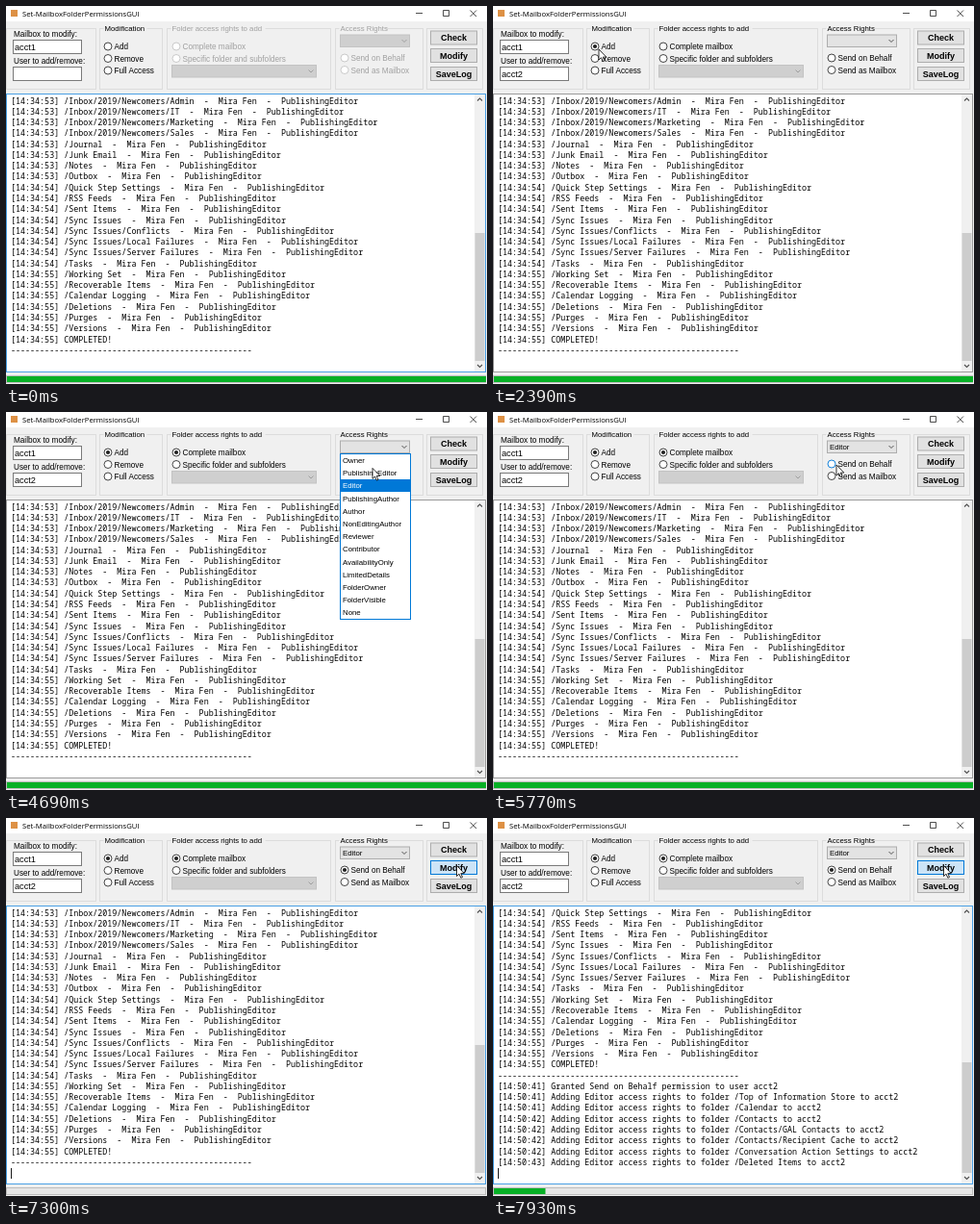
These frames come from a looping animation (500x393 px, 8 s). An HTML page:

```html
<!DOCTYPE html>
<html lang="en">
<head>
<meta charset="utf-8">
<title>Mailbox permissions</title>
<style>
  html, body { margin: 0; width: 100%; height: 100%; overflow: hidden; background: #f0f0f0; }
  svg { display: block; width: 500px; height: 393px; }
  text { font: 8.2px "Liberation Sans", Arial, sans-serif; white-space: pre; }
  .title { font: 7.7px "Open Sans", sans-serif; }
  .input { font-size: 9.2px; }
  .item { font-size: 7.8px; }
  .bold { font-size: 9px; font-weight: bold; text-anchor: middle; }
  .log { font: 8.37px "Noto Sans Mono", monospace; }
</style>
</head>
<body>
<svg id="stage" viewBox="0 0 500 393"></svg>
<script>
const LOOP = 8000, STEP = 76.9;
const BLUE = '#0078d7', GREY = '#a0a0a0', INK = '#000';
const PERSON = 'Mira Fen', OWNER = 'acct1', DELEGATE = 'acct2';
const LINE = 11.27, VISIBLE = 24;

// Folders grouped by the second in which they were logged
const scanned = [
  [53, 'Inbox/2019/Newcomers/Admin,Inbox/2019/Newcomers/IT,Inbox/2019/Newcomers/Marketing,Inbox/2019/Newcomers/Sales,Journal,Junk Email,Notes,Outbox'],
  [54, 'Quick Step Settings,RSS Feeds,Sent Items,Sync Issues,Sync Issues/Conflicts,Sync Issues/Local Failures,Sync Issues/Server Failures,Tasks'],
  [55, 'Working Set,Recoverable Items,Calendar Logging,Deletions,Purges,Versions']
];
const granted = [
  [41, 'Top of Information Store,Calendar'],
  [42, 'Contacts,Contacts/GAL Contacts,Contacts/Recipient Cache,Conversation Action Settings'],
  [43, 'Deleted Items']
];
const expand = (groups, format) =>
  groups.flatMap(([second, names]) => names.split(',').map(name => format(second, name)));
const log = [
  ...expand(scanned, (s, name) => `[14:34:${s}] /${name}  -  ${PERSON}  -  PublishingEditor`),
  '[14:34:55] COMPLETED!',
  '-'.repeat(50),
  `[14:50:41] Granted Send on Behalf permission to user ${DELEGATE}`,
  ...expand(granted, (s, name) => `[14:50:${s}] Adding Editor access rights to folder /${name} to ${DELEGATE}`)
];
const rights = ['Owner', 'PublishingEditor', 'Editor', 'PublishingAuthor', 'Author', 'NonEditingAuthor',
  'Reviewer', 'Contributor', 'AvailabilityOnly', 'LimitedDetails', 'FolderOwner', 'FolderVisible', 'None'];

// Pointer path: step, x, y
const path = [
  [24, 50, 68], [28, 106, 42], [31, 110, 45], [33, 163, 48], [36, 178, 42], [39, 180, 42],
  [43, 266, 53], [45, 330, 56], [46, 384, 57], [49, 392, 57], [54, 390, 38], [58, 390, 38],
  [63, 375, 72], [69, 372, 72], [75, 357, 55], [80, 356, 54], [86, 468.5, 49.5]
];

const clamp = (v, lo, hi) => Math.min(hi, Math.max(lo, v));

function pointerAt(step) {
  const next = path.findIndex(key => key[0] > step);
  if (next < 0) return path[path.length - 1].slice(1);
  const [s0, x0, y0] = path[next - 1], [s1, x1, y1] = path[next];
  const k = (step - s0) / (s1 - s0);
  return [x0 + (x1 - x0) * k, y0 + (y1 - y0) * k];
}

const rect = (x, y, w, h, fill, stroke = 'none') =>
  `<rect x="${x}" y="${y}" width="${w}" height="${h}" fill="${fill}" stroke="${stroke}"/>`;
const line = (d, stroke, width = 1) =>
  `<path d="${d}" fill="none" stroke="${stroke}" stroke-width="${width}"/>`;
const text = (x, y, str, cls = '', fill = INK) =>
  `<text x="${x}" y="${y}" class="${cls}" fill="${fill}">${str}</text>`;

function group(x, w, label = '', labelWidth = 0, fill = INK) {
  return rect(x, 23.5, w, 63, 'none', '#dcdcdc') +
    rect(x + 4, 20, labelWidth, 7, '#f0f0f0') + text(x + 5, 26, label, 'item', fill);
}

function radio(x, y, label, { on = false, enabled = true, hover = false } = {}) {
  const ring = !enabled ? '#c4c4c4' : hover ? BLUE : '#333';
  return `<circle cx="${x}" cy="${y}" r="4" fill="#fff" stroke="${ring}" stroke-width=".9"/>` +
    (on ? `<circle cx="${x}" cy="${y}" r="2.1" fill="${hover ? BLUE : '#222'}"/>` : '') +
    text(x + 6.5, y + 3, label, '', enabled ? INK : GREY);
}

function combo(x, y, w, enabled, value = '') {
  return rect(x, y, w, 12.5, enabled ? '#e3e3e3' : '#cfcfcf', enabled ? '#adadad' : '#c3c3c3') +
    text(x + 2.5, y + 9, value, 'item') +
    line(`M${x + w - 8} ${y + 5}l2.5 2.5l2.5 -2.5`, enabled ? '#444' : '#999', .9);
}

const field = (y, value, focused) =>
  rect(7.5, y, 71, 14, '#fff', focused ? BLUE : '#7a7a7a') + text(9, y + 10.5, value, 'input');

const button = (y, label, hot) =>
  rect(441.5, y, 48, 14, hot ? '#cce4f7' : '#e1e1e1', hot ? BLUE : '#adadad') +
  text(465.5, y + 10.2, label, 'bold');

function titleBar() {
  return rect(0, 0, 500, 16, '#fff') + rect(5, 4, 7, 7, '#dd9145') +
    text(17, 10.5, 'Set-MailboxFolderPermissionsGUI', 'title') +
    line('M426 7.5h7', '#222', .8) + line('M454.5 4.5h6v6h-6z', '#222', .8) +
    line('M482.5 4.5l6.5 6.5m0 -6.5l-6.5 6.5', '#222', .8);
}

function logView(step) {
  const added = clamp(step - 95, 0, 8), focused = step < 5 || step >= 90;
  const thumbTop = 236 + added * 2.25;
  return rect(.5, 91.5, 498, 289, '#fff', focused ? '#4aa0e4' : '#9a9a9a') +
    log.slice(added, added + VISIBLE)
      .map((row, i) => text(5, 101.6 + i * LINE, row, 'log')).join('') +
    (step >= 90 ? rect(5, 364, .9, 11, INK) : '') +
    rect(487, 92, 11, 288, '#f0f0f0') + rect(487.5, thumbTop, 10, 369 - thumbTop, '#cdcdcd') +
    line('M490 98.5l2.5 -2.5l2.5 2.5M490 373l2.5 2.5l2.5 -2.5', '#505050', 1.1);
}

function progress(step) {
  const width = step < 90 ? 498 : Math.max(0, (step - 98) * 10.7);
  return rect(.5, 384.5, 498, 7, '#e6e6e6', '#bcbcbc') + rect(1, 385, width, 6, '#06b025');
}

function rightsList() {
  return rect(347.5, 43.5, 73, 172, '#fff', BLUE) + rect(348, 70, 72, 13, BLUE) +
    rights.map((name, i) => text(350, 53 + i * 13.2, name, 'item', i === 2 ? '#fff' : INK)).join('');
}

function pointer(step) {
  const [x, y] = pointerAt(step);
  return `<path transform="translate(${x} ${y})" d="M0 0V11L2.5 8.7L4.3 12.7L6 12L4.3 8.1H7.8Z" fill="#fff" stroke="#000" stroke-width=".8"/>`;
}

function draw(step) {
  const between = (from, to) => step >= from && step < to;
  const enabled = step >= 28;
  const label = enabled ? INK : GREY;
  const typed = DELEGATE.slice(0, clamp(Math.floor((step - 12) / 2), 0, 5));
  return rect(0, 0, 500, 393, '#f0f0f0') + titleBar() +
    group(.5, 93) + group(97.5, 65, 'Modification', 45) +
    group(167.5, 170, 'Folder access rights to add', 98, label) +
    group(342.5, 91, 'Access Rights', 49, label) + group(437.5, 58) +
    text(8, 32, 'Mailbox to modify:') + field(35.5, OWNER) +
    text(8, 60, 'User to add/remove:') + field(63.5, typed, between(5, 28)) +
    radio(106, 42, 'Add', { on: enabled, hover: between(27, 30) }) +
    radio(106, 54.5, 'Remove') + radio(106, 67, 'Full Access') +
    radio(177, 42, 'Complete mailbox', { on: step >= 38, enabled, hover: between(35, 41) }) +
    radio(177, 54.5, 'Specific folder and subfolders', { enabled }) +
    combo(172.5, 61.5, 150, false) +
    combo(347.5, 30, 72, enabled, step >= 69 ? 'Editor' : '') +
    radio(352, 54, 'Send on Behalf', { on: step >= 80, enabled, hover: between(46, 50) || between(74, 82) }) +
    radio(352, 66.5, 'Send as Mailbox', { enabled }) +
    button(26, 'Check') + button(44.5, 'Modify', step >= 86) + button(63.5, 'SaveLog') +
    logView(step) + progress(step) +
    (between(58, 69) ? rightsList() : '') +
    (step >= 24 ? pointer(step) : '');
}

const stage = document.getElementById('stage');
let shown = -1;
function tick() {
  const step = Math.floor((performance.now() % LOOP + 8) / STEP);
  if (step !== shown) stage.innerHTML = draw(shown = step);
  requestAnimationFrame(tick);
}
tick();
</script>
</body>
</html>
```
